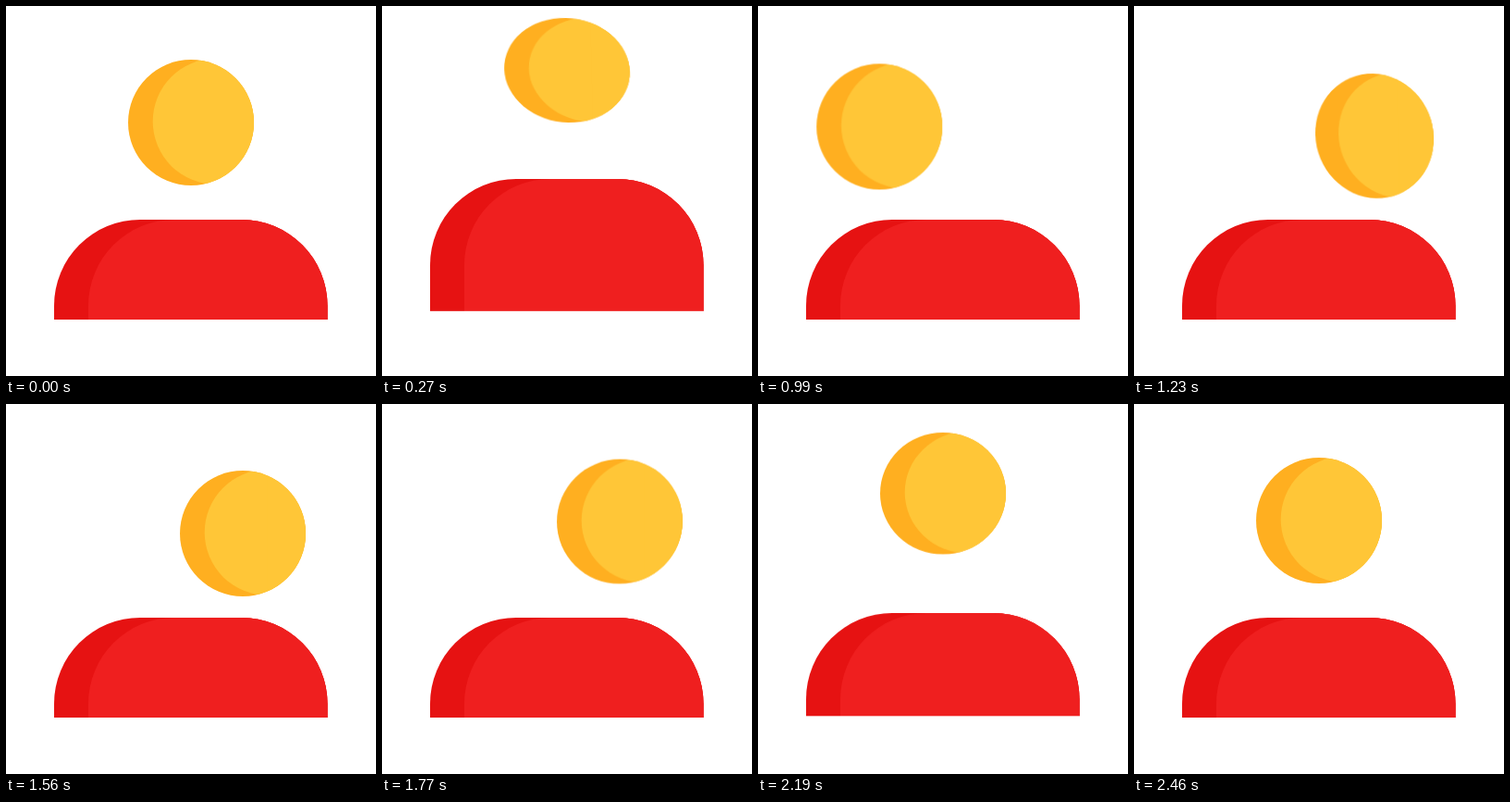
These frames come from a looping animation (400 px wide and 400 px high, 5.02 s). An HTML page:

```html
<!DOCTYPE html>
<html lang="en">
<head>
<meta charset="utf-8">
<title>Account icon</title>
<style>
  html, body { margin: 0; width: 100%; height: 100%; overflow: hidden; background: #fff; }
  svg { display: block; width: 100%; height: 100%; }
  #head, #body, #floor { transform-box: view-box; transform-origin: 0 0; }
</style>
</head>
<body>
<svg viewBox="0 0 400 400">
  <defs>
    <circle id="disc" r="68"/>
    <path id="torso" d="M52 420V324A93 93 0 0 1 145 231H254.500A93 93 0 0 1 347.500 324V420Z"/>
    <clipPath id="discClip"><use href="#disc"/></clipPath>
    <clipPath id="torsoClip"><use href="#torso"/></clipPath>
  </defs>
  <g id="body">
    <use href="#torso" fill="#e61212"/>
    <g clip-path="url(#torsoClip)"><use href="#torso" x="37" fill="#ef1f1f"/><path d="M250 231h100v190h-100z" fill="#ef1f1f"/></g>
  </g>
  <!-- White floor hides the long torso below its lower edge. -->
  <rect id="floor" y="339" width="400" height="100" fill="#fff"/>
  <g id="head">
    <use href="#disc" fill="#ffaf20"/>
    <g clip-path="url(#discClip)"><use href="#disc" x="26.700" y="-1.200" fill="#ffc637"/><path d="M27-68h45v136h-45z" fill="#ffc637"/></g>
  </g>
</svg>
<script>
  const LOOP = 5020;
  const IN = 'cubic-bezier(.5,0,.9,.6)', OUT = 'cubic-bezier(.1,.5,.5,1)', BOTH = 'ease-in-out';

  // time, centre x, centre y, squash direction, squash, easing to the next pose
  const headPoses = [
    [0, 200, 126, -90, 1],
    [30, 200, 126, -90, 1, BOTH],
    [210, 200, 75, -88, 1, OUT],
    [270, 200, 69.5, -83, .828, BOTH],
    [360, 190, 80, -150, 1, IN],
    [540, 146, 140, -180, 1, OUT],
    [600, 122.5, 140, -180, .904, BOTH],
    [720, 144, 140, -180, 1],
    [930, 144, 140, -21.5, 1, BOTH],
    [1035, 124, 125, -21.5, 1, IN],
    [1125, 194, 149, -21.5, 1, OUT],
    [1230, 260, 140.5, -21.5, .931, BOTH],
    [1350, 256, 140, -21.5, 1],
    [1560, 256, 140, -108, 1, 'ease-in'],
    [1770, 257, 127, -108, .99, 'ease-in'],
    [1890, 234, 97, -108, 1],
    [1980, 200.5, 72.5, -108, .909, OUT],
    [2025, 200, 70, -95, .86, BOTH],
    [2070, 200, 76, -90, .95, IN],
    [2250, 200, 131, -90, 1, BOTH],
    [2460, 200, 126, -90, 1],
    [LOOP, 200, 126, -90, 1]
  ];

  // time, rise of the shoulders, easing
  const bodyPoses = [
    [0, 0], [30, 0, BOTH], [270, 44, BOTH], [530, 0],
    [1780, 0, 'ease-in'], [1980, 33, OUT], [2025, 41, BOTH],
    [2070, 36, BOTH], [2250, -4, BOTH], [2460, 0], [LOOP, 0]
  ];

  function play(id, poses, toTransform) {
    const frames = poses.map(pose => ({
      offset: pose[0] / LOOP,
      easing: pose.slice(1).find(v => typeof v === 'string') || 'linear',
      transform: toTransform(pose)
    }));
    document.getElementById(id).animate(frames, { duration: LOOP, iterations: Infinity });
  }

  play('head', headPoses, ([, x, y, angle, squash]) =>
    `translate(${x}px,${y}px) rotate(${angle}deg) scale(${squash},1) rotate(${-angle}deg)`);
  play('body', bodyPoses, ([, rise]) => `translate(0px,${-rise}px)`);
  play('floor', bodyPoses, ([, rise]) => `translate(0px,${-Math.max(0, rise) * .208}px)`);
</script>
</body>
</html>
```
